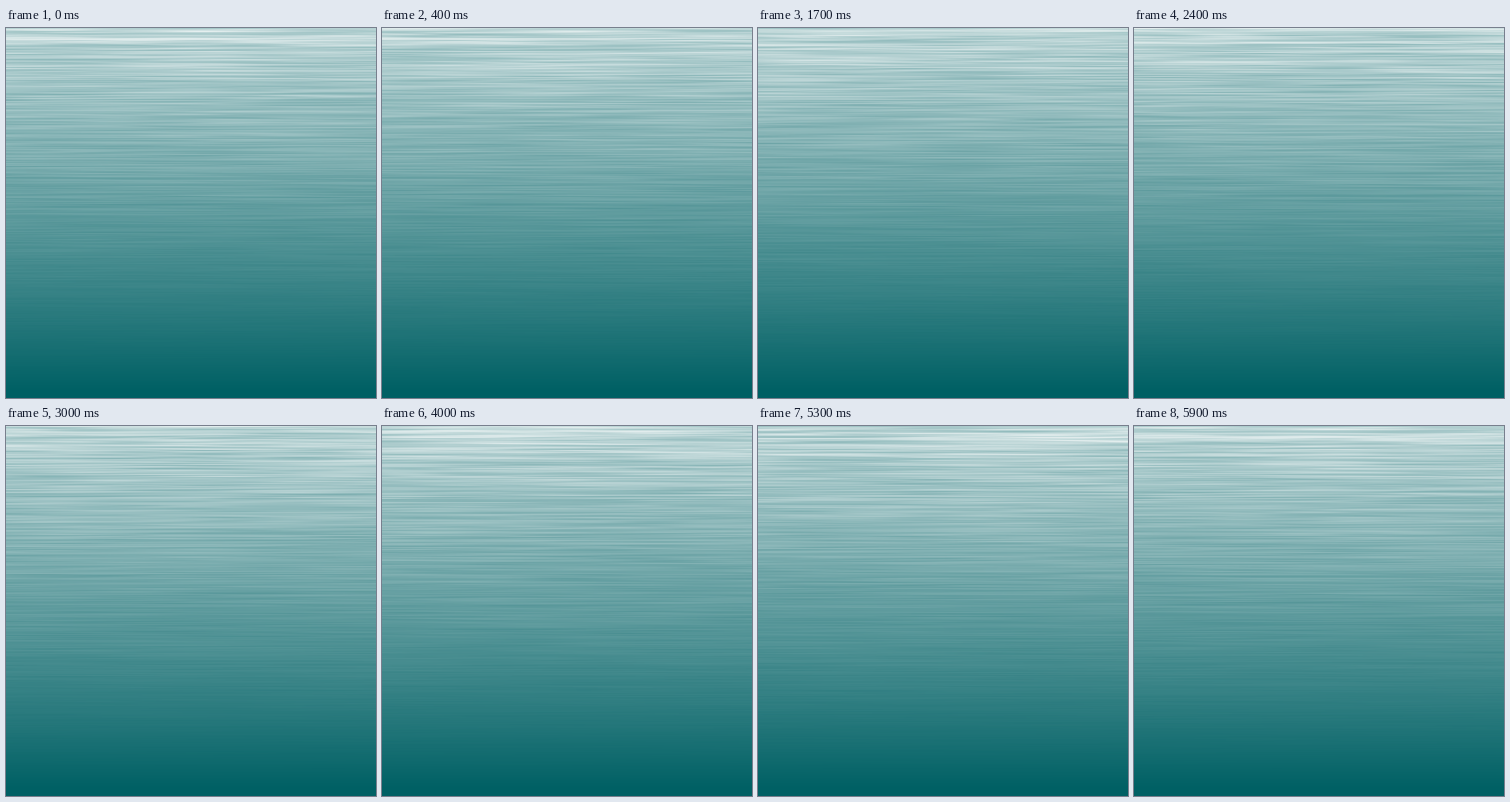
An HTML page with a canvas that plays this animation: 400 px wide and 400 px high, repeating every 6 s.

```html
<!DOCTYPE html>
<html lang="en">
<head>
<meta charset="utf-8">
<title>Water</title>
<style>
  html, body { margin: 0; width: 100%; height: 100%; overflow: hidden; background: #006064; }
  canvas { display: block; width: 400px; height: 400px; }
</style>
</head>
<body>
<canvas id="water" width="400" height="400"></canvas>
<script>
const SIZE = 400, LOOP = 6000, STEP = 100;
const DEEP = [0, 96, 100];
const ctx = document.getElementById('water').getContext('2d');
const img = ctx.createImageData(SIZE, SIZE);
const px = img.data;

let seed = 7321;
function rand() {
  seed = (seed + 0x6D2B79F5) | 0;
  let h = Math.imul(seed ^ (seed >>> 15), seed | 1);
  h ^= h + Math.imul(h ^ (h >>> 7), h | 61);
  return ((h ^ (h >>> 14)) >>> 0) / 4294967296;
}

const smooth = f => f * f * (3 - 2 * f);

// A grid of oscillating values, each repeating a whole number of times per loop.
function makeLayer(cellW, rows, weight, maxSpeed) {
  const cols = Math.ceil(SIZE / cellW) + 2;
  const count = cols * rows;
  const phase = Float32Array.from({ length: count }, () => rand() * Math.PI * 2);
  const speed = Uint8Array.from({ length: count }, () => 1 + Math.floor(rand() * maxSpeed));
  // Shifting each row keeps the cell edges from lining up.
  const shift = Float32Array.from({ length: rows }, rand);
  const value = new Float32Array(count);
  const line = new Float32Array(SIZE * rows);
  return {
    update(angle) {
      for (let i = 0; i < count; i++) value[i] = weight * Math.sin(phase[i] + speed[i] * angle);
      for (let r = 0; r < rows; r++) {
        for (let x = 0; x < SIZE; x++) {
          const u = x / cellW + shift[r], c = Math.floor(u), i = r * cols + c;
          line[r * SIZE + x] = value[i] + (value[i + 1] - value[i]) * smooth(u - c);
        }
      }
    },
    at(x, s) {
      const r = Math.floor(s), i = r * SIZE + x;
      return line[i] + (line[i + SIZE] - line[i]) * smooth(s - r);
    }
  };
}

const long = makeLayer(170, SIZE + 2, 0.75, 3);
const fine = makeLayer(65, SIZE + 2, 0.55, 3);
const broad = makeLayer(130, 32, 0.2, 2);
const layers = [long, fine, broad];

function draw(time) {
  const angle = time / LOOP * Math.PI * 2;
  layers.forEach(layer => layer.update(angle));
  for (let y = 0, p = 0; y < SIZE; y++) {
    const v = 1 - y / SIZE;
    const light = 0.75 * v - 0.02 * (1 - v) ** 4;
    const contrast = 0.12 * v ** 1.8;
    // Streaks are a little thicker near the surface.
    const depth = y - 12 * (1 - Math.exp(-y / 30));
    for (let x = 0; x < SIZE; x++, p += 4) {
      const n = long.at(x, depth) + fine.at(x, y) + broad.at(x, y / 14);
      const a = Math.min(1, Math.max(0, light + contrast * n));
      for (let c = 0; c < 3; c++) px[p + c] = DEEP[c] + (255 - DEEP[c]) * a;
      px[p + 3] = 255;
    }
  }
  ctx.putImageData(img, 0, 0);
}

let shown = -1;
function tick() {
  const step = Math.floor(performance.now() % LOOP / STEP);
  if (step !== shown) draw((shown = step) * STEP);
  requestAnimationFrame(tick);
}
tick();
</script>
</body>
</html>
```
